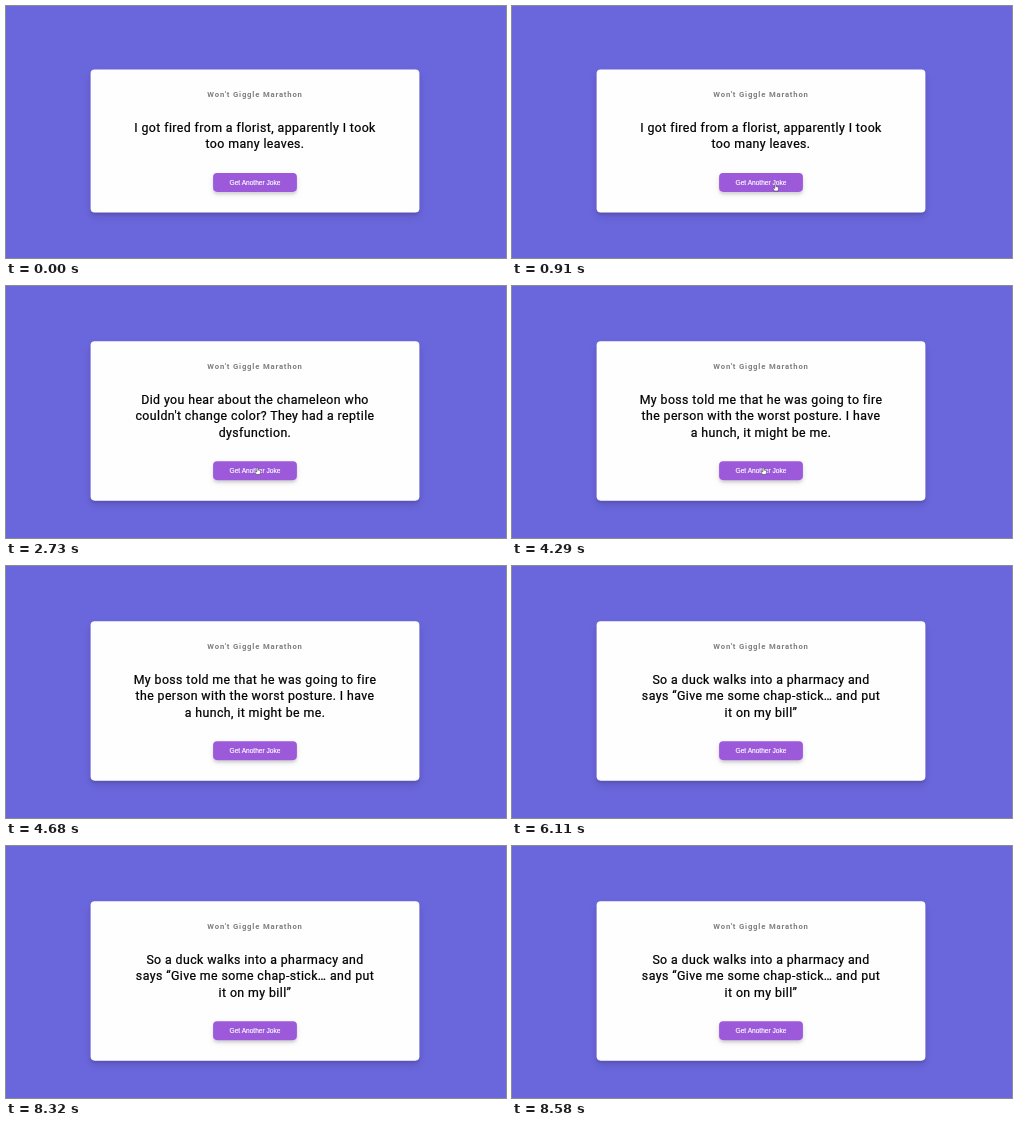
An HTML page for the animation above (9.1 s loop, 500 by 252 pixels).

```html
<!DOCTYPE html>
<html lang="en">
<head>
<meta charset="utf-8">
<title>Joke card</title>
<style>
  html, body { margin: 0; width: 100%; height: 100%; overflow: hidden; background: #6a66dc; }
  .card {
    position: absolute; left: 248.5px; top: 135px;
    box-sizing: border-box; width: 800px; padding: 50px 20px;
    transform: translate(-50%, -50%) scale(.411);
    background: #fefefe; border-radius: 10px; text-align: center;
    font-family: Roboto, sans-serif; color: #000;
    box-shadow: 0 10px 20px rgba(0,0,0,.1), 0 6px 6px rgba(0,0,0,.1);
  }
  h3 { margin: 0; font-size: 18.72px; line-height: 22px; letter-spacing: 2px; opacity: .5; }
  .joke {
    margin: 50px 0; font-size: 30px; line-height: 40px; letter-spacing: 1px;
    white-space: pre; -webkit-text-stroke: .6px;
  }
  .btn {
    width: fit-content; margin: 0 auto; padding: 14px 40px;
    background: #9c5adb; color: #fff; border-radius: 10px;
    font: 16px/18px "Liberation Sans", Arial, sans-serif; -webkit-text-stroke: .4px;
    box-shadow: 0 5px 15px rgba(0,0,0,.1), 0 6px 6px rgba(0,0,0,.1);
  }
  svg { position: absolute; left: 0; top: 0; overflow: visible; }
</style>
</head>
<body>
<div class="card">
  <h3>Won't Giggle Marathon</h3>
  <div class="joke"></div>
  <div class="btn">Get Another Joke</div>
</div>
<svg width="10" height="10" stroke="#333" stroke-width=".5" stroke-linejoin="round">
  <path id="hand" fill="#fff" d="M-.6 .5Q0-.4 .6 .5V2.6L3 3.2V5.2L2.3 7H-1L-2.6 4.4Q-2.4 3.4-.6 4.4Z"/>
  <path id="arrow" fill="#111" stroke="#fff" d="M0 0V6.5L1.5 5.2L2.6 7.5L3.5 7L2.5 4.8H4.6Z"/>
</svg>
<script>
const LOOP = 9100, STEP = 130;
const jokes = [
  [0, "I got fired from a florist, apparently I took\ntoo many leaves."],
  [1430, "Did you hear about the chameleon who\ncouldn't change color? They had a reptile\ndysfunction."],
  [4290, "My boss told me that he was going to fire\nthe person with the worst posture. I have\na hunch, it might be me."],
  [6110, "So a duck walks into a pharmacy and\nsays “Give me some chap-stick… and put\nit on my bill”"]
];
// Pointer stops: time, x, y
const path = [[260, 292, 246], [910, 263.5, 178], [1300, 263.5, 178], [1430, 264, 180],
              [2080, 264, 180], [2730, 251.5, 181.5], [4420, 251.5, 181.5]];
const joke = document.querySelector(".joke");
const pointer = document.querySelector("svg");
const show = (el, on) => el.style.display = on ? "" : "none";

function pointerAt(t) {
  const i = path.findIndex(p => p[0] > t);
  if (i < 1) return null;
  const [a, b] = [path[i - 1], path[i]];
  const k = (t - a[0]) / (b[0] - a[0]), e = k * (2 - k);
  return [a[1] + (b[1] - a[1]) * e, a[2] + (b[2] - a[2]) * e];
}

function draw() {
  const t = Math.floor(performance.now() % LOOP / STEP) * STEP;
  const text = jokes.filter(j => j[0] <= t).pop()[1];
  if (joke.textContent !== text) joke.textContent = text;
  const p = pointerAt(t);
  show(pointer, p);
  if (p) {
    pointer.style.transform = `translate(${p[0]}px, ${p[1]}px)`;
    show(hand, p[1] < 186);
    show(arrow, p[1] >= 186);
  }
  requestAnimationFrame(draw);
}
draw();
</script>
</body>
</html>
```
